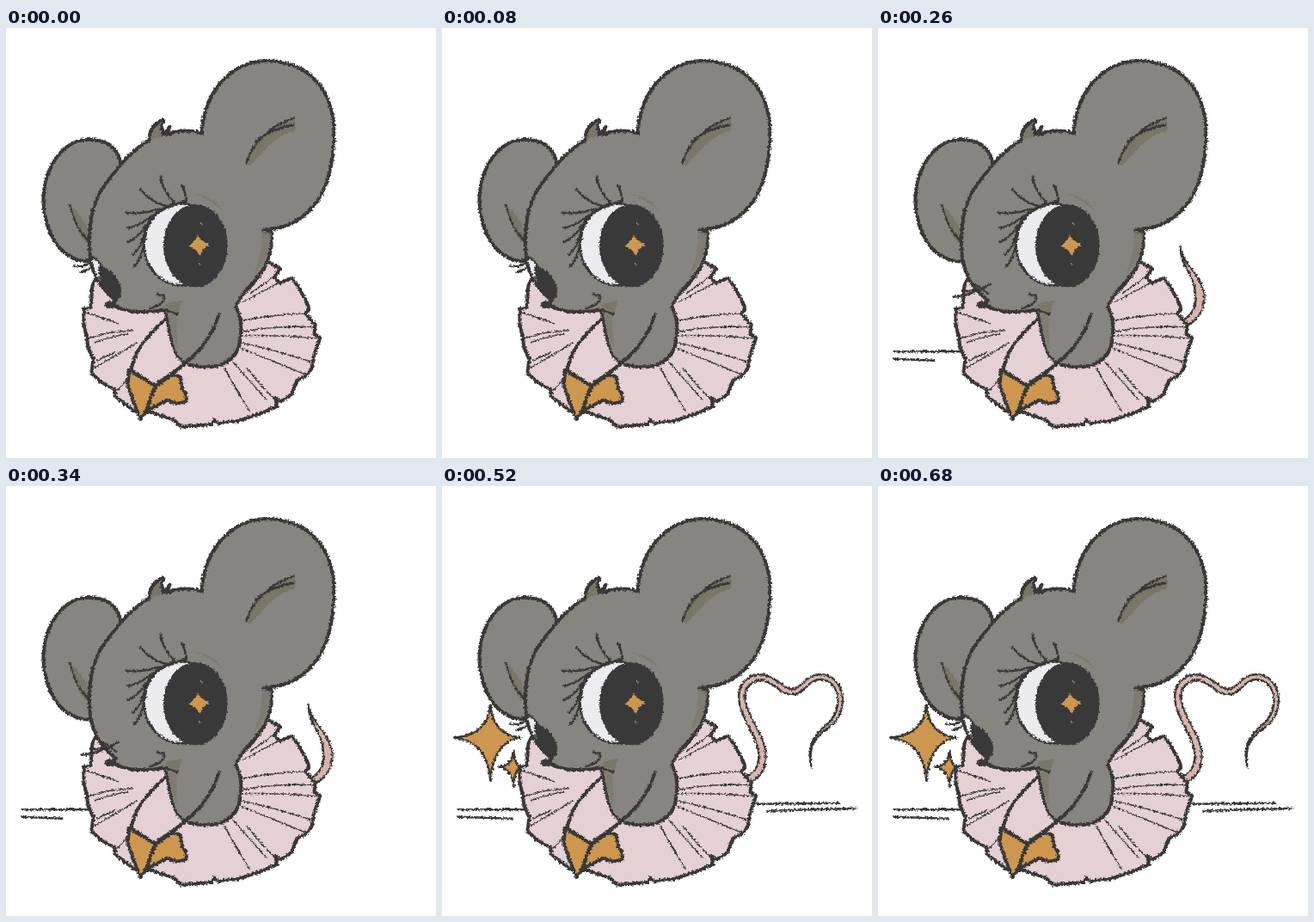
An HTML page for the animation above (0.78 s loop, 500x500 px).

```html
<!DOCTYPE html>
<html lang="en">
<head>
<meta charset="utf-8">
<title>Winking mouse</title>
<style>
html, body { margin: 0; width: 100%; height: 100%; overflow: hidden; background: #fff; }
svg { display: block; width: 100vw; height: 100vh; }
.ink { fill: none; stroke: #393837; stroke-width: 4; stroke-linecap: round; stroke-linejoin: round; }
.thin { stroke-width: 1.5; }
.mid { stroke-width: 2.6; }
.grey { fill: #878580; }
.pink { fill: #e4d0d5; }
.gold { fill: #cd9750; }
.white { fill: #ecebee; }
.dark { fill: #393939; stroke: none; }
.shade { fill: #7a7668; stroke: none; }
.tail { fill: #d8b5ac; stroke-width: 2.4; }
</style>
</head>
<body>
<svg viewBox="0 0 500 500" xmlns="http://www.w3.org/2000/svg">
<defs>
  <filter id="rough" x="0" y="0" width="500" height="500" filterUnits="userSpaceOnUse" color-interpolation-filters="sRGB">
    <feTurbulence type="fractalNoise" baseFrequency=".42" numOctaves="2" seed="4"/>
    <feDisplacementMap in="SourceGraphic" scale="4.5" xChannelSelector="R" yChannelSelector="G"/>
  </filter>
  <clipPath id="face"><path d="M97 262L160 262V322H125C113 309 104 293 97 262Z"/></clipPath>
</defs>
<g filter="url(#rough)">
<g transform="translate(-.6 -.3)">
  <g id="tails"></g>
  <g id="ground"></g>

  <!-- tutu -->
  <path class="ink pink" d="M104 293L101 300L99 325L91 327L91 345L94 357L96 372L102 385L100 402L113 413L128 421L127 428L142 440L152 447L166 446L196 456L204 464L220 463L240 461L243 456L247 460L272 457L298 448L316 440L314 431L320 435L332 427L339 410L350 404L356 397L359 380L366 360L359 356L360 345L349 333L353 325L341 302L333 291L319 297L313 290L319 280L300 269L200 270Z"/>
  <path class="ink thin" d="M314 288L285 309M317 297L276 319M303 279L284 305M277 340Q315 333 350 332M278 353Q320 346 358 348M277 358Q320 357 362 361M273 366Q315 375 354 388M270 371Q312 388 351 404M255 396Q270 425 284 446M265 389Q285 412 304 433M281 396Q300 420 315 434M259 404L273 427M92 331Q110 336 131 344M96 361Q120 353 148 352M104 366Q125 358 143 356M103 396Q130 380 153 366M129 423L145 405M107 387L128 377"/>

  <!-- ears -->
  <path class="ink grey" d="M135 160C131 140 118 130 97 130C65 130 44 165 44 202C46 240 64 271 99 272L125 230Z"/>
  <path class="shade" d="M75 206C88 217 97 228 98 253C86 245 80 228 75 206Z"/>
  <path class="ink mid" d="M75 206C79 224 87 239 97 248"/>

  <!-- head and body -->
  <path class="ink grey" d="M228 123C230 96 239 74 255 59C272 41 300 34 325 41C361 49 381 80 382 120C382 157 374 192 356 210C340 228 321 235 299 235L309 237C312 257 304 276 295 288C283 303 270 314 268 325C273 334 275 348 273 362C271 381 258 392 242 394C225 396 207 392 199 382C191 370 191 348 185 328C170 331 142 333 124 322L128 317C113 305 100 287 98 262C96 230 101 200 117 181C132 160 148 141 167 131C167 119 173 111 184 107C180 116 182 119 184 124L191 115L188 124C202 119 215 118 228 123Z"/>
  <path class="grey" d="M227 125C246 160 280 222 300 234L282 245L190 170Z"/>
  <path class="shade" d="M169 131C169 121 174 114 181 111C178 118 180 122 182 126Z"/>
  <path class="shade" d="M280 158C287 136 306 115 336 103L338 119C312 126 300 144 284 161Z"/>
  <path class="ink mid" d="M280 157C286 137 306 114 335 105M291 132C304 122 318 115 335 113"/>
  <path class="shade" d="M309 239C309 259 299 277 289 286C295 268 300 252 298 238Z" opacity=".6"/>
  <path class="shade" d="M185 323C192 318 200 318 206 318L199 334Z"/>
  <path class="shade" d="M188 332L199 334L200 374C194 362 192 347 188 332Z" opacity=".7"/>
  <path class="shade" d="M219 193C237 195 248 203 254 214C242 203 232 198 219 193Z" opacity=".65"/>

  <!-- muzzle -->
  <path class="ink mid" d="M168 326C178 324 187 318 184 311L176 310M182 327L200 333"/>
  <ellipse class="dark" cx="122" cy="322" rx="6.5" ry="4.5"/>

  <!-- arms and hands -->
  <path class="pink" d="M186 340C162 360 150 378 147 399L166 412L193 401L205 389C194 381 190 362 186 340Z"/>
  <path class="ink" d="M186 339C161 361 149 378 146 400M166 412L147 399"/>
  <path class="ink" d="M248 333C241 360 223 384 176 414"/>
  <path class="ink mid" d="M199 381Q206 391 219 393"/>
  <path class="ink gold" d="M144 398L142 416L150 438L157 455L164 444L174 416L164 410Z"/>
  <path class="ink gold" d="M176 416L194 403L203 406L206 420Q212 429 210 435L198 437L188 433L165 445L169 429Z"/>

  <!-- large eye -->
  <ellipse class="ink white mid" cx="205" cy="252" rx="44" ry="47.5"/>
  <ellipse class="dark" cx="221" cy="253.5" rx="37.5" ry="48"/>
  <path class="gold" d="M223 241Q228 249 237 252Q229 256 226 265Q221 256 213 254Q221 249 223 241Z"/>
  <circle class="white" cx="228" cy="228" r="1"/><circle class="white" cx="227" cy="275" r="1"/>
  <path class="ink" d="M162 246C161 227 175 207 210 203"/>
  <path class="ink mid" d="M197 204Q184 192 180 173M186 207Q168 202 157 188M210 203Q210 191 205 183M177 211Q160 217 140 215M170 219Q155 231 141 233M164 229Q156 243 143 249M161 240Q158 255 148 264M161 250Q159 268 149 278"/>

  <!-- small eye -->
  <g data-on="04">
    <path class="white" clip-path="url(#face)" d="M98 266C106 267 112 274 114 282L107 290Z"/>
    <path class="dark" clip-path="url(#face)" d="M108 277C121 278 133 291 135 306Q135 317 128 315C116 309 108 295 108 277Z"/>
    <path class="ink mid" d="M99 266Q107 268 112 278M101 268Q90 272 77 269M100 273Q91 279 80 277M101 277Q95 283 87 284"/>
  </g>
  <g data-on="1">
    <path class="dark" d="M105 280C118 276 133 288 135 304Q133 312 127 311C115 303 107 293 105 280Z"/>
    <path class="ink mid" d="M104 281Q114 276 124 283"/>
    <path class="ink thin" d="M105 282Q94 283 83 276M105 285Q95 289 83 288M107 289Q97 293 89 294"/>
  </g>
  <g data-on="2">
    <path class="ink mid" d="M88 313Q109 312 131 298M108 296Q121 301 128 309M101 307L117 304"/>
  </g>
  <g data-on="3">
    <path class="white" d="M104 280Q115 278 121 285L110 292Z"/>
    <path class="dark" d="M109 286C121 280 133 291 135 304Q133 312 127 311C117 305 110 296 109 286Z"/>
    <path class="ink mid" d="M104 281Q115 278 123 285"/>
    <path class="ink thin" d="M104 281Q94 283 83 277M104 284Q94 288 82 288M106 289Q97 293 88 293"/>
  </g>
  <g id="sparkles"></g>
</g>
</g>
</svg>
<script>
const STEP = 130, LOOP = 780, LAST = 4;
const NS = "http://www.w3.org/2000/svg";
const byId = id => document.getElementById(id);

function addPath(parent, cls, d, on) {
  const p = document.createElementNS(NS, "path");
  p.setAttribute("class", cls);
  p.setAttribute("d", d);
  if (on !== undefined) p.dataset.on = on;
  byId(parent).append(p);
  return p;
}

// Turns a centre line into a ribbon whose width tapers along its length.
function ribbon(path, width) {
  const len = path.getTotalLength(), n = 50, a = [], b = [];
  for (let i = 0; i <= n; i++) {
    const s = len * i / n;
    const p = path.getPointAtLength(s);
    const q = path.getPointAtLength(Math.max(0, s - .5));
    const r = path.getPointAtLength(Math.min(len, s + .5));
    const dx = r.x - q.x, dy = r.y - q.y, m = Math.hypot(dx, dy) || 1;
    const w = width(i / n) / 2;
    a.push([p.x - dy / m * w, p.y + dx / m * w]);
    b.unshift([p.x + dy / m * w, p.y - dx / m * w]);
  }
  path.setAttribute("d", "M" + a.concat(b).map(p => p.map(v => v.toFixed(1))).join("L") + "Z");
}

const base = "M356 342C375 334 379 311 364 285C350 259 342 239 358 227C374 215 389 231 400 238";
const tails = [
  ["M358 343C381 329 379 304 362 280Q353 267 352 254", 2,
    t => t < .4 ? 8 + t * 6 : 10.4 * Math.pow((1 - t) / .6, 1.1)],
  [base + "Q411 245 425 230", 3, t => t < .8 ? 9 - t * 5 : Math.max(0, (1 - t) * 25)],
  [base + "C418 247 422 223 440 222C467 223 471 260 452 277C435 290 425 300 430 327", 4,
    t => t < .8 ? 8.5 - t * 4 : Math.max(0, (1 - t) * 26)]
];
for (const [d, on, width] of tails) ribbon(addPath("tails", "ink tail", d, on), width);

// x and y at the start, the end x for each step, then the drop
const lines = [
  [19, 376.5, [0, 78, 96, 96, 96], 0],
  [19, 385, [0, 0, 66, 81, 82], 2],
  [366, 370, [0, 0, 0, 440, 462], -1],
  [379, 378, [0, 0, 0, 0, 482], -3]
].map(([x, y, ends, drop]) => ({ x, y, ends, drop, el: addPath("ground", "ink mid", "") }));

// A four-pointed star with separate arm lengths and inked tips.
function star(cx, cy, left, up, right, down, on) {
  const tips = [[0, -up], [right, 0], [0, down], [-left, 0]];
  const at = (x, y) => `${cx + x} ${cy + y} `;
  const k = .08;
  let d = "M" + at(...tips[0]);
  tips.forEach(([x, y], i) => {
    const [u, v] = tips[(i + 1) % 4];
    d += "Q" + at((x + u) * k, (y + v) * k) + at(u, v);
  });
  addPath("sparkles", "ink gold mid", d + "Z", on);
}
star(56, 293, 21, 23, 22, 24, 3);
star(57, 293, 42, 38, 35, 50, 4);
star(84, 327, 17, 19, 9, 24, 4);

const parts = [...document.querySelectorAll("[data-on]")];
let shown = -1;

function draw(ms) {
  const step = Math.min(LAST, Math.floor(ms % LOOP / STEP));
  if (step === shown) return;
  shown = step;
  for (const p of parts) p.style.display = p.dataset.on.includes(step) ? "" : "none";
  for (const { x, y, ends, drop, el } of lines)
    el.setAttribute("d", ends[step] ? `M${x} ${y}L${ends[step]} ${y + drop}` : "");
}

const start = performance.now();
function tick() {
  draw(performance.now() - start);
  requestAnimationFrame(tick);
}
tick();
</script>
</body>
</html>
```
